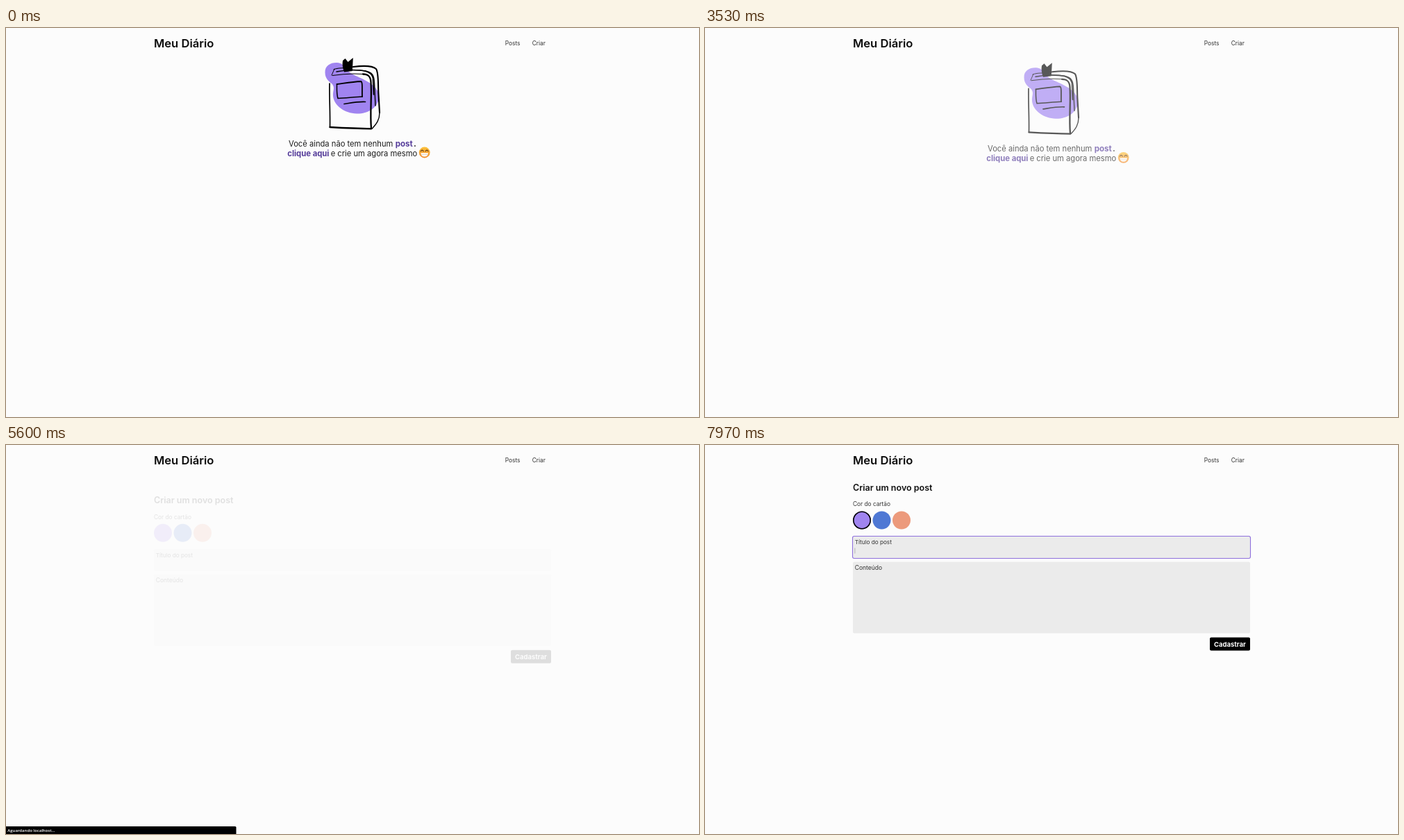
Recreate the animation shown at these times as an HTML page with a canvas. Size 998 px wide and 561 px high, loop 8 s.

```html
<!DOCTYPE html>
<html lang="pt">
<head>
<meta charset="utf-8">
<title>Meu Diário</title>
<style>
html, body { margin: 0; width: 100%; height: 100%; overflow: hidden; background: #fcfcfc; }
canvas { display: block; width: 998px; height: 561px; }
</style>
</head>
<body>
<canvas id="stage" width="998" height="561"></canvas>
<script>
const ctx = document.getElementById("stage").getContext("2d");
const W = 998, H = 561, LOOP = 8000;
const BG = "#fcfcfc", INK = "#1c1c1c", PURPLE = "#a084f0", LINK = "#553c9a";

const ENTER_MS = 2000, ENTER_SHIFT = 20.8;
const POSTS_AT = 2776, FORM_AT = 5374;
const RING_AT = 6950, FOCUS_AT = 7600;
const STATUS = [[1300, 2150], [5300, 5760]];

// CSS "ease": cubic-bezier(.25, .1, .25, 1), solved by bisection
function ease(x) {
  if (x <= 0) return 0;
  if (x >= 1) return 1;
  const bez = (a, b, s) => 3 * a * s * (1 - s) ** 2 + 3 * b * s * s * (1 - s) + s ** 3;
  let lo = 0, hi = 1;
  for (let i = 0; i < 24; i++) {
    const mid = (lo + hi) / 2;
    if (bez(0.25, 0.25, mid) < x) lo = mid; else hi = mid;
  }
  return bez(0.1, 1, lo);
}

function text(str, x, y, size, weight = 400, color = INK, family = "Inter") {
  ctx.font = `${weight} ${size}px "${family}", sans-serif`;
  ctx.fillStyle = color;
  ctx.fillText(str, x, y);
}

function box(x, y, w, h, r, color) {
  ctx.fillStyle = color;
  ctx.beginPath();
  ctx.roundRect(x, y, w, h, r);
  ctx.fill();
}

function disc(x, y, r, color) {
  ctx.fillStyle = color;
  ctx.beginPath();
  ctx.arc(x, y, r, 0, Math.PI * 2);
  ctx.fill();
}

function line(d, width, color = "#000") {
  ctx.strokeStyle = color;
  ctx.lineWidth = width;
  ctx.stroke(new Path2D(d));
}

function shape(d, color) {
  ctx.fillStyle = color;
  ctx.fill(new Path2D(d));
}

function book() {
  shape("M459.5 64C459 54 468 49.5 477 50C488 51 488 59 495 64C502 69 512 72 520 77" +
    "C531 83 538 91 537 101C535 116 520 124 505 123.5C488 123 472 112 471 98" +
    "C470.5 90 474 87 470 81C465 77 459.5 73 459.5 64Z", PURPLE);
  ctx.lineCap = ctx.lineJoin = "round";

  // front cover
  line("M466 80C465.5 100 467 122 466.5 143", 1.7);
  line("M466.5 143C485 144 505 145 526 145.3", 2.3);
  line("M526 145C524 122 527 98 525.5 78C525 69 521 66.5 514 66.5", 2.3);
  line("M514 66.5C502 65.5 486 66 470 68.5", 1.1);

  // page block and back cover
  line("M476 63C492 60 506 60 518 62C528 64 530 69 530.5 79L532 112", 1.4);
  line("M499 60.5C511 60.5 526 61 528.5 72L529.5 96", 1.7);
  line("M472 60C476 57.5 482 58 488 57.5", 1.1);
  line("M500 56C512 54.5 527 53.5 533 59C537 65 535.5 82 536.5 96L538 122", 2.1);
  line("M538 122C538 132 534 138 527 145.3", 1.4);
  line("M469 68L473 59", 0.9);

  // label and rules
  line("M476.5 81C488 79.5 500 77.5 511 77C514 77 512.5 90 513 99", 1.8);
  line("M513 99C501 99.5 490 101 478 101.5C476 95 476.5 88 476.5 81", 1.5);
  line("M487 109.5C497 108 507 106 517.5 106.5", 1.7);

  shape("M485 47L488.5 44L492.5 49L499.8 43L498.8 62L487 63.5Q483.5 55 485 47Z", "#000");
}

function grin(x, y) {
  const g = ctx.createLinearGradient(0, y - 8, 0, y + 8);
  g.addColorStop(0, "#fcc33c");
  g.addColorStop(1, "#f28a2c");
  disc(x, y, 7.9, g);
  const brown = "#5f3a1c";
  for (const ex of [x - 3.4, x + 3.4])
    line(`M${ex - 1.9} ${y - 1.8}Q${ex} ${y - 5} ${ex + 1.9} ${y - 1.8}`, 1.2, brown);
  shape(`M${x - 5.3} ${y + 0.7}H${x + 5.3}Q${x + 5} ${y + 6} ${x} ${y + 6}Q${x - 5} ${y + 6} ${x - 5.3} ${y + 0.7}Z`, "#fff");
  line(`M${x - 4.8} ${y + 3.2}H${x + 4.8}`, 0.6, "#c9a98a");
}

function posts() {
  book();
  text("Você ainda não tem nenhum", 407, 170.5, 11.2);
  text("post", 560.7, 170.5, 11.6, 700, LINK);
  text(".", 587, 170.5, 11.6, 700);
  text("clique aqui", 405.3, 184.8, 11.3, 700, LINK);
  text("e crie um agora mesmo", 467.7, 184.8, 11.2);
  grin(602.7, 179.5);
}

function form(t) {
  text("Criar um novo post", 213, 66, 12.5, 600, "#111");
  text("Cor do cartão", 213, 88.3, 8.3, 400, "#333");
  [PURPLE, "#4f78d4", "#ec9a7c"].forEach((c, i) => disc(226 + 28.5 * i, 108.5, 13, c));
  if (t >= RING_AT) {
    ctx.strokeStyle = "#000";
    ctx.lineWidth = 1.6;
    ctx.beginPath();
    ctx.arc(226, 108.5, 12.2, 0, Math.PI * 2);
    ctx.stroke();
  }

  box(213, 132, 572, 31, 2, "#ebebeb");
  box(213, 168.5, 572, 103, 2, "#ebebeb");
  if (t >= FOCUS_AT) {
    ctx.strokeStyle = "#8f70dc";
    ctx.lineWidth = 1.1;
    ctx.beginPath();
    ctx.roundRect(212.5, 131.5, 573, 32, 2.5);
    ctx.stroke();
    box(215.5, 148.5, 0.8, 8, 0, "#a8a8a8");
  }
  text("Título do post", 215.7, 143.4, 8.2, 400, "#333");
  text("Conteúdo", 215.7, 179.9, 8.5, 400, "#333");

  box(727, 277.5, 58, 19, 2, "#000");
  text("Cadastrar", 733, 290.7, 9.5, 700, "#fff");
}

// Rises into place while fading in; the fade is a veil of the page colour.
function enter(page, t, start) {
  const p = ease((t - start) / ENTER_MS);
  ctx.save();
  ctx.translate(0, ENTER_SHIFT * (1 - p));
  page(t);
  ctx.restore();
  ctx.globalAlpha = 1 - p;
  ctx.fillStyle = BG;
  ctx.fillRect(0, 0, W, H);
  ctx.globalAlpha = 1;
}

function draw(t) {
  ctx.fillStyle = BG;
  ctx.fillRect(0, 0, W, H);

  if (t < POSTS_AT) posts();
  else if (t < FORM_AT) enter(posts, t, POSTS_AT);
  else enter(form, t, FORM_AT);

  text("Meu Diário", 213, 28, 16.6, 600, "#0c0c0c");
  text("Posts", 718.7, 25, 8.4, 400, "#333");
  text("Criar", 757.7, 25, 8.4, 400, "#333");

  if (STATUS.some(([a, b]) => t >= a && t < b)) {
    box(0, 550, 331.5, 11, [0, 1.5, 0, 0], "#000");
    text("Aguardando localhost...", 2.3, 557.8, 6, 600, "#fff", "Open Sans");
  }
}

const t0 = performance.now();
function tick() {
  draw((performance.now() - t0) % LOOP);
  requestAnimationFrame(tick);
}
tick();
</script>
</body>
</html>
```
